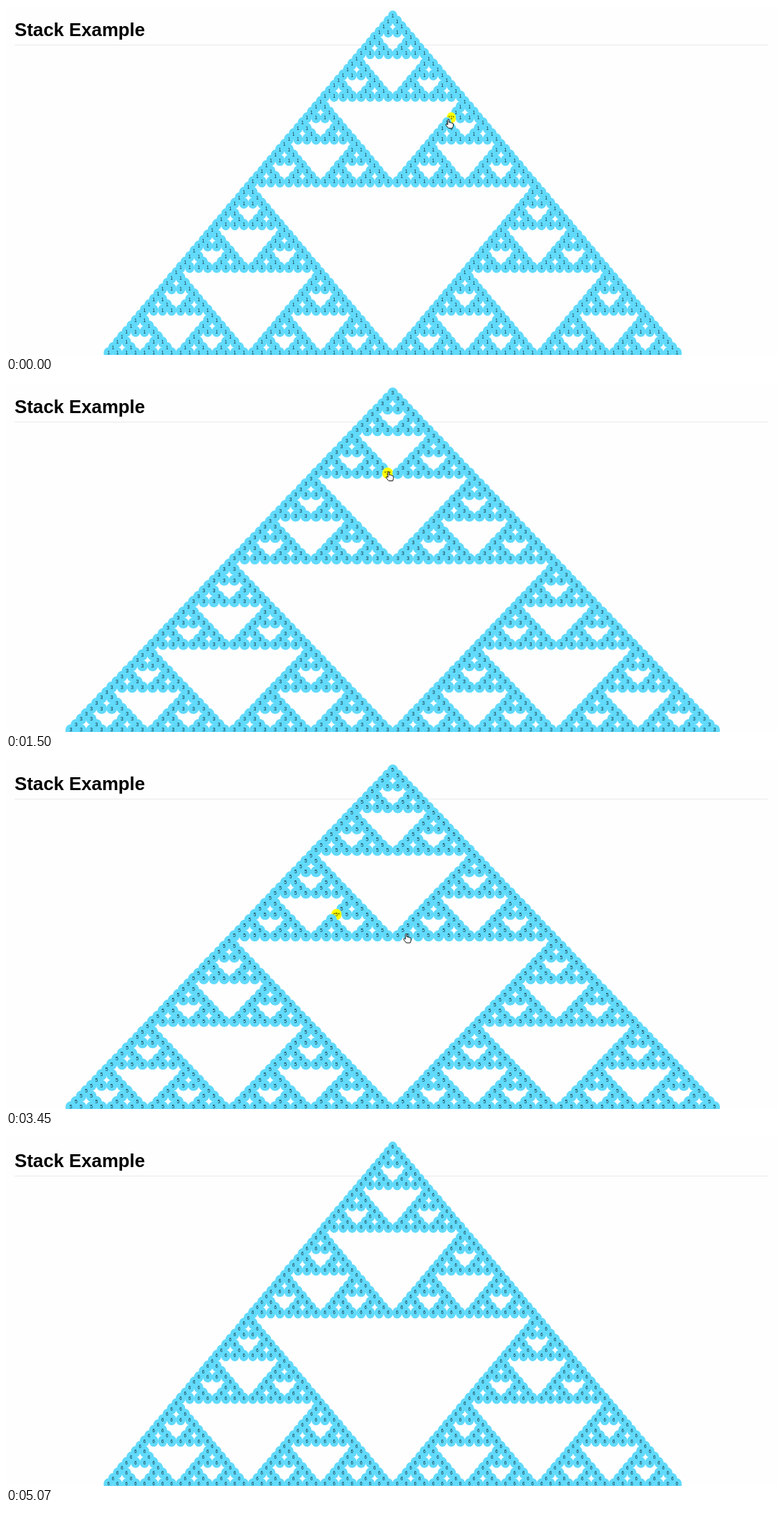
Recreate the animation shown at these times as an HTML page. Size 1078 by 487 pixels, loop 5.17 s.

```html
<!DOCTYPE html>
<html lang="en">
<head>
<meta charset="utf-8">
<title>Stack Example</title>
<style>
  html, body { margin: 0; width: 100%; height: 100%; overflow: hidden; background: #fefefe; }
  body { position: relative; font-family: "Liberation Sans", Arial, sans-serif; color: #000; }
  h1 { position: absolute; left: 12px; top: 18px; margin: 0; font-size: 25.8px; line-height: 30px; white-space: nowrap; }
  hr { position: absolute; left: 12px; top: 54px; width: 1052px; height: 1px; margin: 0; border: 0; background: #eaeaea; }
  #tree { position: absolute; left: 539.5px; top: 13.7px; width: 0; height: 0; transform-origin: 0 0; }
  .dot {
    position: absolute; width: 32.5px; height: 32.5px; margin: -16.25px 0 0 -16.25px;
    border-radius: 50%; background: #61dafb; color: rgba(0, 0, 0, .8);
    font-size: 15px; line-height: 32.5px; text-align: center;
  }
  .dot.on { background: #ff0; }
  svg { position: absolute; left: 0; top: 0; overflow: visible; }
</style>
</head>
<body>
<h1>Stack Example</h1>
<hr>
<div id="tree"></div>
<svg id="cursor" width="12" height="15" stroke-linejoin="round">
  <path id="hand" transform="translate(0 -.6)" fill="#fff" stroke="#111" d="M3.3 8.2V1.8q0-1.2 1-1.2t1 1.2V5q1.6-.6 2 .4 1.4-.4 1.8.6 1.9-.2 1.9 1.4v2.6l-1 3.2H4.6L2 10.4Q.2 8.4 1 7.6t2.3.6z"/>
  <path id="arrow" fill="#000" stroke="#fff" stroke-width=".6" d="M0 0V9.6L2.2 7.6 3.7 11 5.3 10.3 3.9 7.1H6.8z"/>
</svg>
<script>
const LOOP = 5170;
const UNIT = 15.625;   // dot spacing before scaling
const ROW = 7.46;      // row height on screen
const MIN = 6.3, GROW = 0.1665;

// time, width level, counter, hovered dot (row, offset)
const renders = [
  [0, 0, 1, '19,13'], [150, 1, 1, '20,12'], [900, 3, 2, '20,12'],
  [1500, 5, 3, '15,-1'], [1800, 6, 3, '15,-1'], [2550, 8, 4, '15,-1'],
  [2850, 7, 4, '27,-11'], [3150, 6, 4, '27,-11'], [3450, 5, 5, '27,-11'],
  [3750, 4, 5, '31,3'], [4050, 3, 5, '31,3'],
  [4500, 2, 6], [4800, 1, 6], [5070, 0, 6]
];

// time, shape, x, y
const moves = [
  [0, 'hand', 613.5, 158], [450, 'hand', 600, 153], [600, 'arrow', 568, 138],
  [750, 'arrow', 537, 126], [1200, 'hand', 530, 124],
  [1800, 'hand', 526, 130], [1950, 'hand', 500, 165], [2100, 'hand', 470, 203],
  [2250, 'hand', 460, 211], [3000, 'hand', 464, 213], [3150, 'hand', 495, 222],
  [3300, 'hand', 535, 236], [3450, 'hand', 554.5, 242.5],
  [3900, 'hand', 558, 256], [4050, 'hand', 564.5, 296],
  [4350, 'arrow', 760, 300], [4500, 'arrow', 960, 306], [4650, 'arrow', 1051, 310],
  [4800, 'none', 0, 0]
];

const $ = id => document.getElementById(id);
const tree = $('tree'), cursor = $('cursor'), shapes = [$('hand'), $('arrow')];
const dots = new Map();

// Later children paint over earlier ones.
function build(row, off, size) {
  if (size === 1) {
    const dot = document.createElement('div');
    dot.className = 'dot';
    dot.style.left = off * UNIT + 'px';
    dot.style.top = row * UNIT + 'px';
    tree.append(dot);
    dots.set(row + ',' + off, dot);
    return;
  }
  const half = size / 2;
  build(row, off, half);
  build(row + half, off - half, half);
  build(row + half, off + half, half);
}

function showTree([, level, count, hovered]) {
  tree.style.transform = `scale(${(MIN + GROW * level) / UNIT}, ${ROW / UNIT})`;
  for (const [key, dot] of dots) {
    const on = key === hovered;
    dot.classList.toggle('on', on);
    dot.textContent = on ? `*${count}*` : count;
  }
}

function showCursor([, shape, x, y]) {
  cursor.style.transform = `translate(${x}px, ${y}px)`;
  for (const s of shapes) s.style.display = s.id === shape ? '' : 'none';
}

const at = (steps, t) => steps.findLast(step => step[0] <= t);

build(0, 0, 64);
const start = performance.now();
let render, move;

function tick() {
  const t = Math.max(0, performance.now() - start) % LOOP;
  const nextRender = at(renders, t), nextMove = at(moves, t);
  if (nextRender !== render) showTree(render = nextRender);
  if (nextMove !== move) showCursor(move = nextMove);
  requestAnimationFrame(tick);
}
tick();
</script>
</body>
</html>
```
